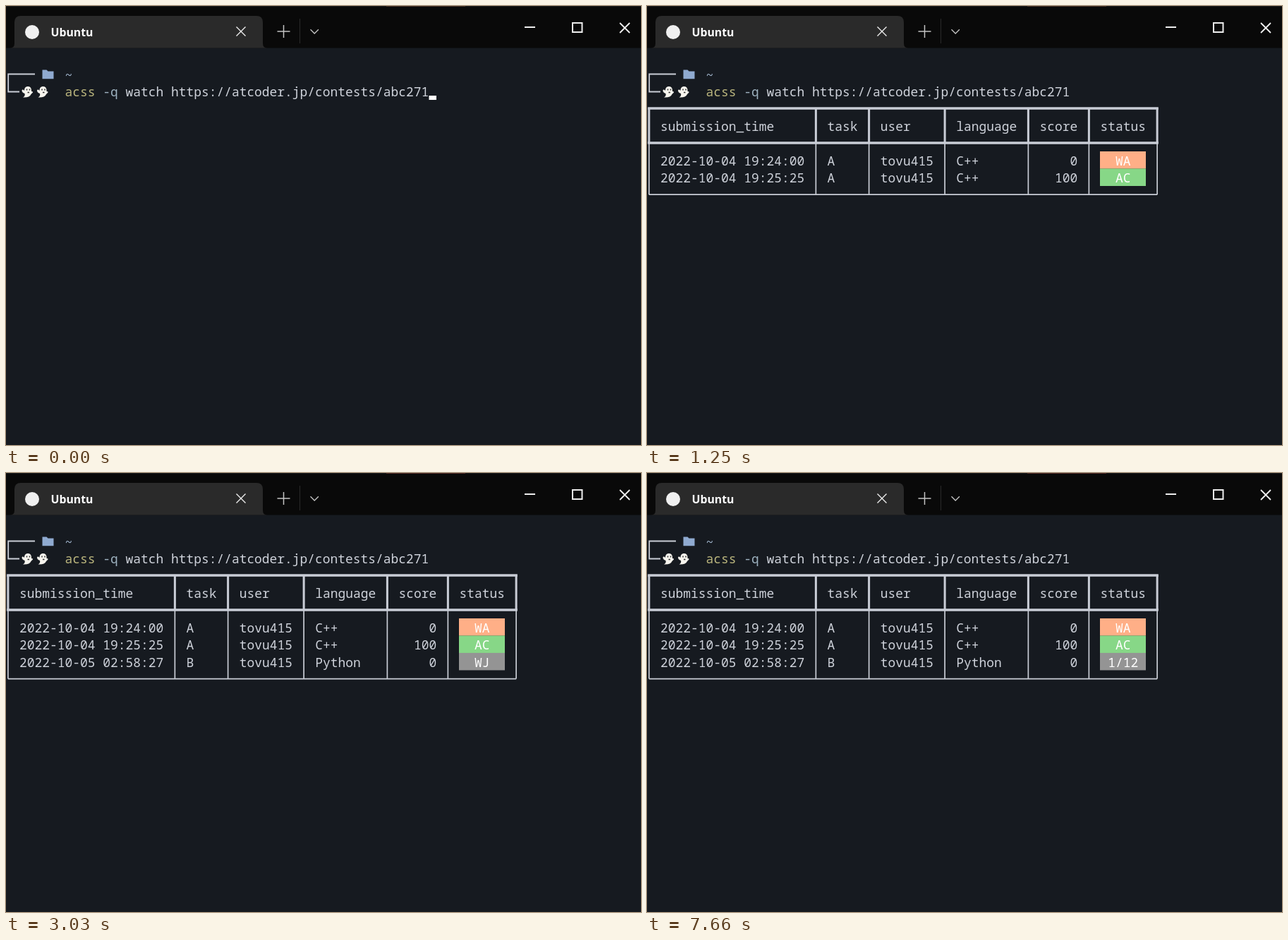
Write an HTML page that moves like this. It is 900 px wide and 622 px high and loops after 8000 ms.

```html
<!DOCTYPE html>
<html lang="en">
<meta charset="utf-8">
<title>Terminal</title>
<style>
html, body { margin: 0; width: 100%; height: 100%; overflow: hidden; background: #161a20; }
svg { display: block; width: 900px; height: 622px; }
text { font: 17.92px "Noto Sans Mono", "DejaVu Sans Mono", monospace; fill: #ced2da; white-space: pre; }
.tab { font: 700 15.8px "Open Sans", "Noto Sans", sans-serif; fill: #fff; }
.line { fill: none; stroke: #c9cdd6; }
.icon { fill: none; stroke: #eee; }
.dim { fill: none; stroke: #c4c4c4; }
</style>
<svg viewBox="0 0 900 622">
  <rect width="900" height="59.5" fill="#090909"/>
  <rect width="900" height="1" fill="#1b1b1b"/>
  <rect id="edge" x="539" width="112" height="1"/>
  <path d="M6 59.5Q12 59.5 12 53V23Q12 14 21 14H355Q364 14 364 23V53Q364 59.5 370 59.5Z" fill="#2a2a2a"/>
  <circle cx="37" cy="37" r="10" fill="#f0f0f0"/>
  <text class="tab" x="63.5" y="43">Ubuntu</text>
  <path class="icon" stroke-width="1.4" d="M326.5 29.5l13 13m0-13l-13 13"/>
  <path class="dim" stroke-width="1.5" d="M384.5 36h18M393.5 27v18"/>
  <path class="dim" stroke-width="1.3" d="M431.5 33.3l5.7 5.7 5.7-5.7"/>
  <path d="M416.5 18v35" stroke="#292929"/>
  <path class="icon" stroke-width="2" d="M735 30h15M803 24h13.500v13h-13.500z"/>
  <path class="icon" stroke-width="1.8" d="M870 24l14 14m0-14l-14 14"/>

  <path class="line" stroke-width="1.8" d="M41 96.500H3.200V121.500H19"/>
  <path d="M51.500 90.500h6l2 2h8v10.800h-16z" fill="#8faad0"/>
  <text x="83.5" y="104" style="fill:#a3b8cf">~</text>
  <g id="ghost">
    <path d="M26 120C26 116 28 114 31 114Q35.500 114 36 119L36 121Q38.500 120.500 38 122.500L35.500 125Q33.500 130 24 129.500Q27.500 127.500 26.500 124Q22.500 122.500 22.500 119.500Q23.500 117.500 26 120Z" fill="#f7f5ee"/>
    <path d="M29.500 117.500v2M33.500 117.500v2M30.500 122.500h2.500" stroke="#333" stroke-width="1.5"/>
  </g>
  <use href="#ghost" x="21.500"/>
  <text x="83.5" y="128"><tspan fill="#bab57d">acss</tspan> <tspan fill="#9db1bf">-q</tspan> watch https://atcoder.jp/contests/abc271</text>
  <rect id="cursor" height="6" fill="#fff"/>
  <g id="table"></g>
</svg>
<script>
const $ = id => document.getElementById(id);
const LEFT = -2.5, CELL = 10.75, ROW = 24.45, TOP = 145, MID = 194;
const BORDERS = [0, 22, 29, 39, 50, 58, 67];
const CHANGES = [390, 990, 1250, 3030, 7150];
const ROWS = [
  ["2022-10-04 19:24:00", "A", "tovu415", "C++", "0", "WA", "#ffaf87"],
  ["2022-10-04 19:25:25", "A", "tovu415", "C++", "100", "AC", "#87d787"],
  ["2022-10-05 02:58:27", "B", "tovu415", "Python", "0", "WJ", "#949494"]
];
const colX = col => LEFT + col * CELL;
const text = (str, col, row, fill = "#ced2da") =>
  `<text x="${colX(col)}" y="${Math.round(128 + row * ROW)}" style="fill:${fill}">${str}</text>`;
const line = (d, width) => `<path class="line" stroke-width="${width}" d="${d}"/>`;

function table(count, status) {
  const bottom = 242.7 + (count - 1) * ROW;
  const edges = BORDERS.map(col => colX(col + 0.5));
  const verticals = (from, to) => edges.map(x => `M${x} ${from}V${to}`).join("");
  const across = y => `M${edges[0]} ${y}H${edges[6]}`;
  let out = line(verticals(MID, bottom) + across(bottom), 1.7)
    + line(verticals(TOP, MID), 3)
    + `<g stroke-linecap="square">${line(across(TOP) + across(MID), 3.4)}</g>`;
  ["submission_time", "task", "user", "language", "score", "status"]
    .forEach((name, i) => out += text(name, BORDERS[i] + 2, 2));
  ROWS.slice(0, count).forEach((cells, i) => {
    const row = i + 4;
    const label = i === 2 ? status : cells[5];
    out += `<rect x="642" y="${206 + i * ROW}" width="65" height="${ROW + 0.1}" fill="${cells[6]}"/>`;
    cells.slice(0, 4).forEach((cell, j) => out += text(cell, BORDERS[j] + 2, row));
    out += text(cells[4], 57 - cells[4].length, row);
    out += text(label, 63 - label.length / 2, row, "#fff");
  });
  return out;
}

function draw(stage) {
  const cursor = $("cursor");
  cursor.setAttribute("x", stage ? 0 : 599.5);
  cursor.setAttribute("y", stage ? 151 : 127);
  cursor.setAttribute("width", stage ? 9 : 10.5);
  cursor.setAttribute("visibility", stage < 2 ? "visible" : "hidden");
  $("edge").setAttribute("fill", stage < 4 ? "#4a3426" : "#5a2f28");
  $("table").innerHTML = stage < 3 ? "" : table(stage < 4 ? 2 : 3, stage < 5 ? "WJ" : "1/12");
}

const start = performance.now();
let shown = -1;
function tick() {
  const time = (performance.now() - start) % 8000;
  const stage = CHANGES.filter(t => t <= time).length;
  if (stage !== shown) draw(shown = stage);
  requestAnimationFrame(tick);
}
tick();
</script>
</html>
```
